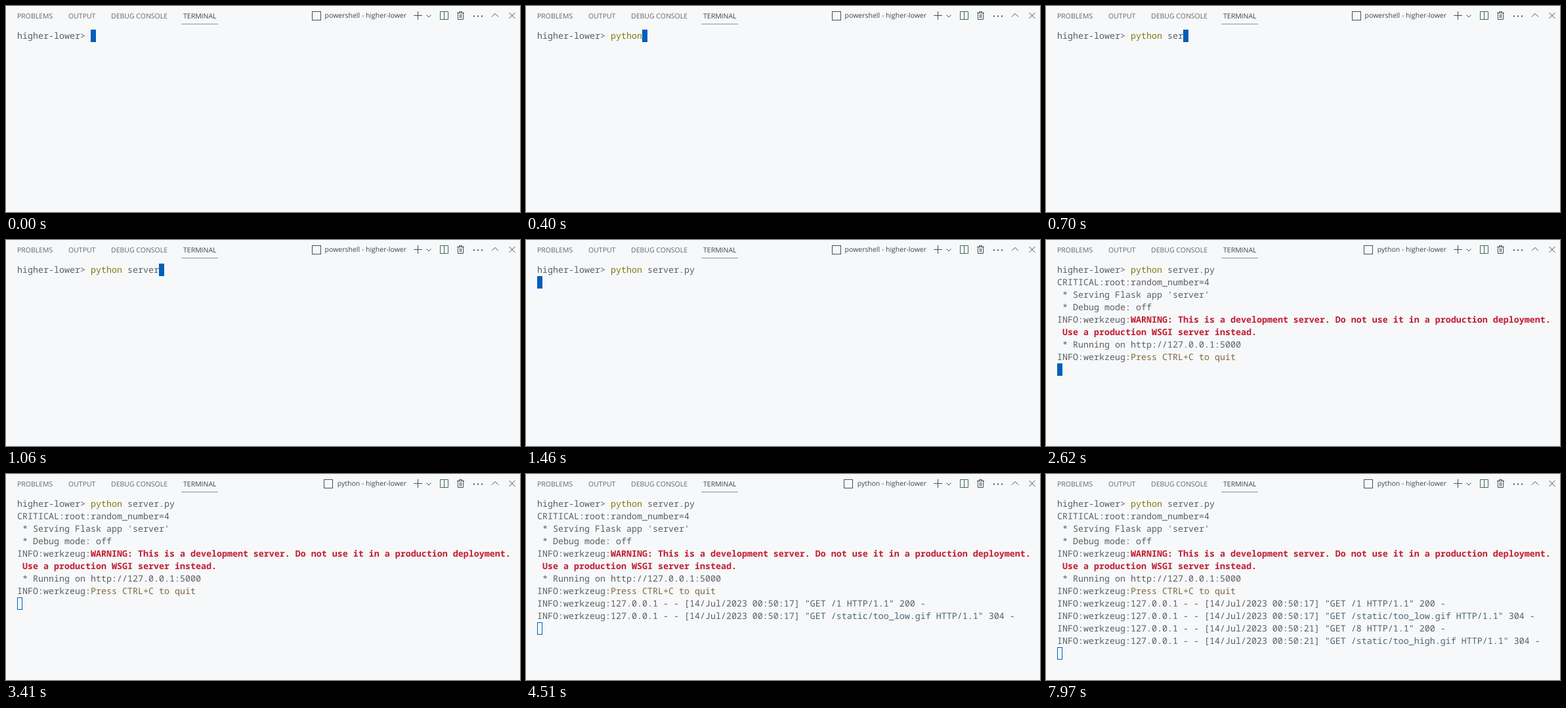
An HTML page for the animation above (8000 ms loop, 783x314 px).

```html
<!DOCTYPE html>
<html lang="en">
<head>
<meta charset="utf-8">
<title>Terminal session</title>
<style>
html, body { margin: 0; width: 100%; height: 100%; overflow: hidden; background: #f6f8fa; }
svg { display: block; }
text { white-space: pre; text-rendering: geometricPrecision; }
.ui { font: 10.5px "Open Sans", "Noto Sans", sans-serif; fill: #666; }
.ui .on { fill: #424242; }
.term { font: 13.3333px "Noto Sans Mono", "DejaVu Sans Mono", monospace; fill: #5e5e5e; }
.cmd { fill: #85790f; }
.warn { fill: #c21c30; font-weight: 700; }
.note { fill: #82683a; }
.cached { fill: #4a6672; }
.icons { fill: none; stroke: #47504e; }
</style>
</head>
<body>
<svg width="783" height="314" viewBox="0 0 783 314">
  <g class="ui">
    <text x="17" y="19">PROBLEMS</text>
    <text x="95" y="19">OUTPUT</text>
    <text x="160" y="19">DEBUG CONSOLE</text>
    <text x="270" y="19" class="on">TERMINAL</text>
    <text x="610" y="18" class="on" text-anchor="end" id="label"></text>
  </g>
  <path d="M267 27.5H323" stroke="#929292"/>
  <g class="icons">
    <rect id="shell" y="8.5" width="13" height="13"/>
    <path d="M621 14.5H634M627.5 8V21M640.5 13.5L644 17L647.5 13.5"/>
    <path d="M661.5 8.5H673.5V20.5H661.5ZM667.5 8.5V20.5" stroke="#3f6a50"/>
    <path d="M687 10.5H698M690.5 10V8.5H694.5V10M688.5 10.5V20.5H696.5V10.5M691.5 12.5V18.5M693.5 12.5V18.5"/>
    <path d="M712 15.5H714M718 15.5H720M724 15.5H726" stroke-width="2"/>
    <path d="M740 16.5L745 11.5L750 16.5M766.5 10L775.5 19M775.5 10L766.5 19"/>
  </g>
  <rect id="cursor" stroke="#005fb8"/>
  <g class="term" id="screen"></g>
</svg>
<script>
const LOOP = 8000, CELL = 8, ROW = 19, LEFT = 17, TOP = 36;
const COMMAND = "python server.py";
const $ = id => document.getElementById(id);
const span = (cls, text) => `<tspan class="${cls}">${text}</tspan>`;
const info = text => "INFO:werkzeug:" + text;
const request = (sec, get, status) =>
  info(`127.0.0.1 - - [14/Jul/2023 00:50:${sec}] ${get} ${status} -`);

const output = [
  [1660, "CRITICAL:root:random_number=4"],
  [1660, " * Serving Flask app 'server'"],
  [1660, " * Debug mode: off"],
  [1660, info(span("warn", "WARNING: This is a development server. Do not use it in a production deployment."))],
  [1660, span("warn", " Use a production WSGI server instead.")],
  [1660, " * Running on http://127.0.0.1:5000"],
  [1660, info(span("note", "Press CTRL+C to quit"))],
  [4510, request(17, '"GET /1 HTTP/1.1"', 200)],
  [4510, request(17, span("cached", '"GET /static/too_low.gif HTTP/1.1"'), 304)],
  [7970, request(21, '"GET /8 HTTP/1.1"', 200)],
  [7970, request(21, span("cached", '"GET /static/too_high.gif HTTP/1.1"'), 304)]
];

// Keystrokes passed in a burst of evenly spaced steps
const steps = (t, start, end, count) =>
  t < start ? 0 : Math.min(count, 1 + Math.floor((t - start) * (count - 1) / (end - start) + 1e-6));

function typed(t) {
  return Math.round(steps(t, 50, 700, 9) * 10 / 9)
    + steps(t, 860, 1160, 4) + steps(t, 1310, 1385, 2);
}

function setAttrs(el, attrs) {
  for (const key in attrs) el.setAttribute(key, attrs[key]);
}

let shown = "";

function draw(now) {
  const t = now % LOOP;
  const count = typed(t), entered = t >= 1460;
  const text = COMMAND.slice(0, count);
  const lines = ["higher-lower&gt; " + span("cmd", text.slice(0, 6)) + text.slice(6)];
  for (const [start, line] of output) if (t >= start) lines.push(line);

  const html = lines.map((line, i) =>
    `<text x="${LEFT}" y="${50 + i * ROW}">${line}</text>`).join("");
  if (html !== shown) $("screen").innerHTML = shown = html;

  const col = entered ? 0 : 14 + count;
  const row = entered ? lines.length : 0;
  setAttrs($("cursor"), {
    x: LEFT + col * CELL + 0.5, y: TOP + row * ROW + 0.5,
    width: CELL - 1, height: ROW - 1,
    fill: t < 3410 ? "#005fb8" : "none"
  });

  const running = t >= 2620;
  $("label").textContent = (running ? "python" : "powershell") + " - higher-lower";
  $("shell").setAttribute("x", running ? 484.5 : 466.5);
}

const begin = performance.now();
function tick() {
  draw(performance.now() - begin);
  requestAnimationFrame(tick);
}
tick();
</script>
</body>
</html>
```
